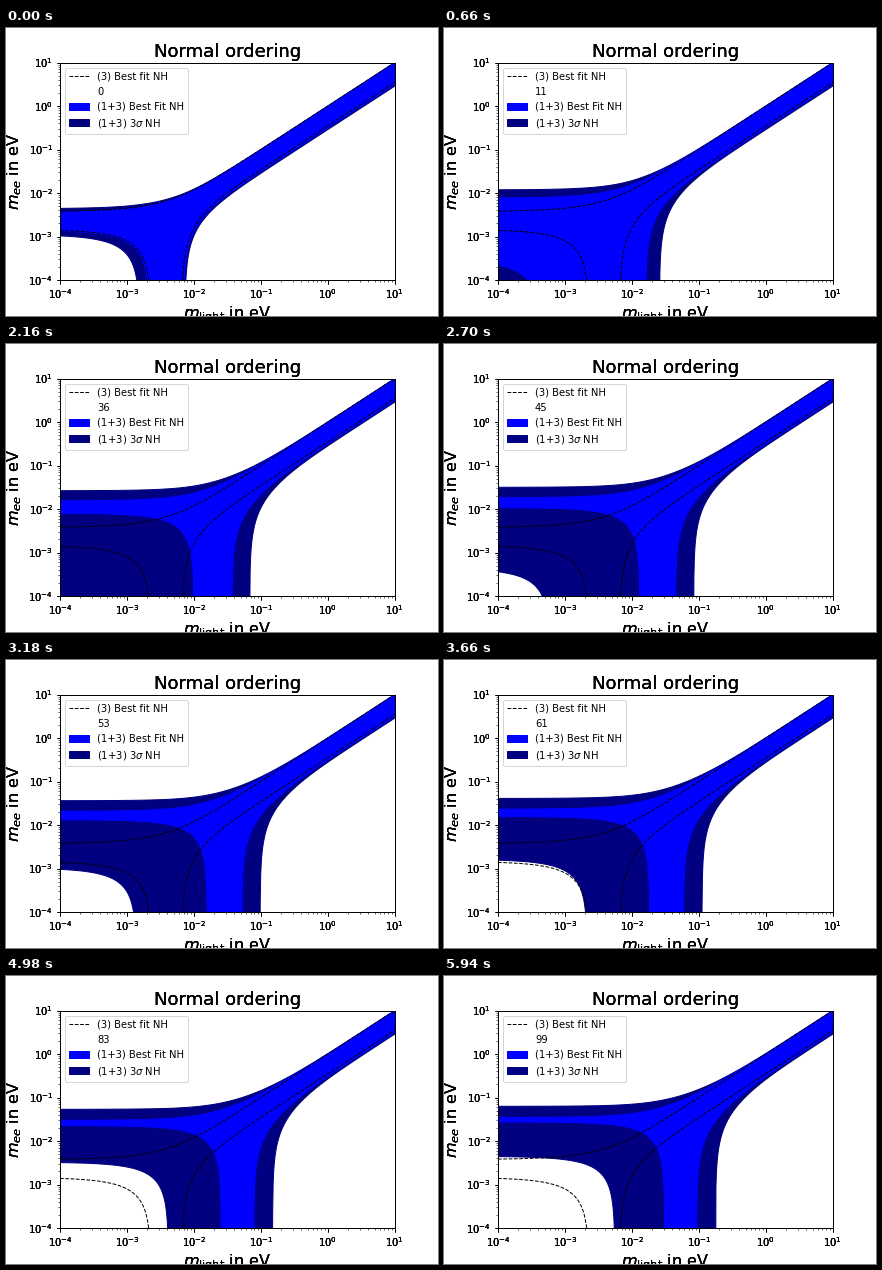
Animation of 432 by 288 pixels, one loop 6000 ms. Source, as a matplotlib script:

```python
import numpy as np
import matplotlib.pyplot as plt
from matplotlib.animation import FuncAnimation
from matplotlib.lines import Line2D
from matplotlib.patches import Patch

FRAMES = 100
FLOOR = 1e-7

# (sin^2 th12, sin^2 th13, dm21^2, dm31^2): best fit and 3 sigma limits
BEST = (0.308, 0.0234, 7.54e-5, 2.47e-3)
LOW = (0.259, 0.0200, 6.99e-5, 2.30e-3)
HIGH = (0.355, 0.0290, 8.15e-5, 2.60e-3)

# sterile mixing sin^2 th14
S14_BEST, S14_LOW, S14_HIGH = 0.0253, 0.0061, 0.0475

m = np.logspace(-4, 1, 700)


def active_terms(params, s14=0.0):
    """Contributions of the three active states to the effective mass."""
    s12, s13, dm21, dm31 = params
    c13, c14 = 1 - s13, 1 - s14
    return (c14 * c13 * (1 - s12) * m,
            c14 * c13 * s12 * np.sqrt(m**2 + dm21),
            c14 * s13 * np.sqrt(m**2 + dm31))


def excess(terms, i):
    """How far term i outweighs all the others together."""
    return 2 * terms[i] - sum(terms)


def smallest(terms):
    """Least modulus of the sum over all free phases."""
    gaps = [excess(terms, i) for i in range(len(terms))]
    return np.maximum(np.max(gaps, axis=0), FLOOR)


def sterile_mass(n):
    scale = 0.0122 * n + 0.024 * (1 - np.exp(-n / 4))
    return np.sqrt(m**2 + scale**2)


def best_band(n):
    terms = active_terms(BEST, S14_BEST) + (S14_BEST * sterile_mass(n),)
    return smallest(terms), sum(terms)


def wide_band(n):
    m4 = sterile_mass(n)
    light = active_terms(BEST, S14_HIGH) + (S14_HIGH * m4,)
    solar = active_terms(LOW, S14_HIGH) + (S14_HIGH * m4,)
    heavy = active_terms(LOW, S14_LOW) + (S14_LOW * m4,)
    low = np.max([excess(light, 0), excess(solar, 1), excess(heavy, 3)], axis=0)
    high = sum(active_terms(HIGH, S14_HIGH)) + S14_HIGH * m4
    return np.maximum(low, FLOOR), high


def make_axes(fig):
    ax = fig.add_axes([0.125, 0.125, 0.775, 0.755])
    ax.set(xscale="log", yscale="log", xlim=(1e-4, 10), ylim=(1e-4, 10))
    ax.set_title("Normal ordering", fontsize=18)
    ax.set_xlabel(r"$m_{\mathrm{light}}$ in eV", fontsize=16)
    ax.set_ylabel(r"$m_{ee}$ in eV", fontsize=16)
    return ax


fig = plt.figure(figsize=(6, 4), dpi=72)
ax = make_axes(fig)

# Overprinted lettering gives the heavy text edges.
for _ in range(2):
    overlay = make_axes(fig)
    overlay.patch.set_visible(False)
    overlay.minorticks_off()

dash = dict(color="black", linestyle="--", linewidth=1)
three = active_terms(BEST)
for curve in (smallest(three), sum(three)):
    ax.plot(m, curve, zorder=3, **dash)

legend = ax.legend(
    handles=[Line2D([], [], label="(3) Best fit NH", **dash),
             Line2D([], [], linestyle="none", label="0"),
             Patch(color="blue", label="(1+3) Best Fit NH"),
             Patch(color="navy", label=r"(1+3) 3$\sigma$ NH")],
    loc="upper left", fontsize=10)
counter = legend.get_texts()[1]
bands = []


def update(n):
    while bands:
        bands.pop().remove()
    for band, color, z in ((wide_band, "navy", 1), (best_band, "blue", 1.5)):
        low, high = band(n)
        bands.append(ax.fill_between(m, low, high, color=color, zorder=z))
    counter.set_text(str(n))
    return [*bands, counter]


anim = FuncAnimation(fig, update, frames=FRAMES, interval=60,
                     init_func=lambda: update(0), repeat=True, repeat_delay=0)
plt.show()
```
